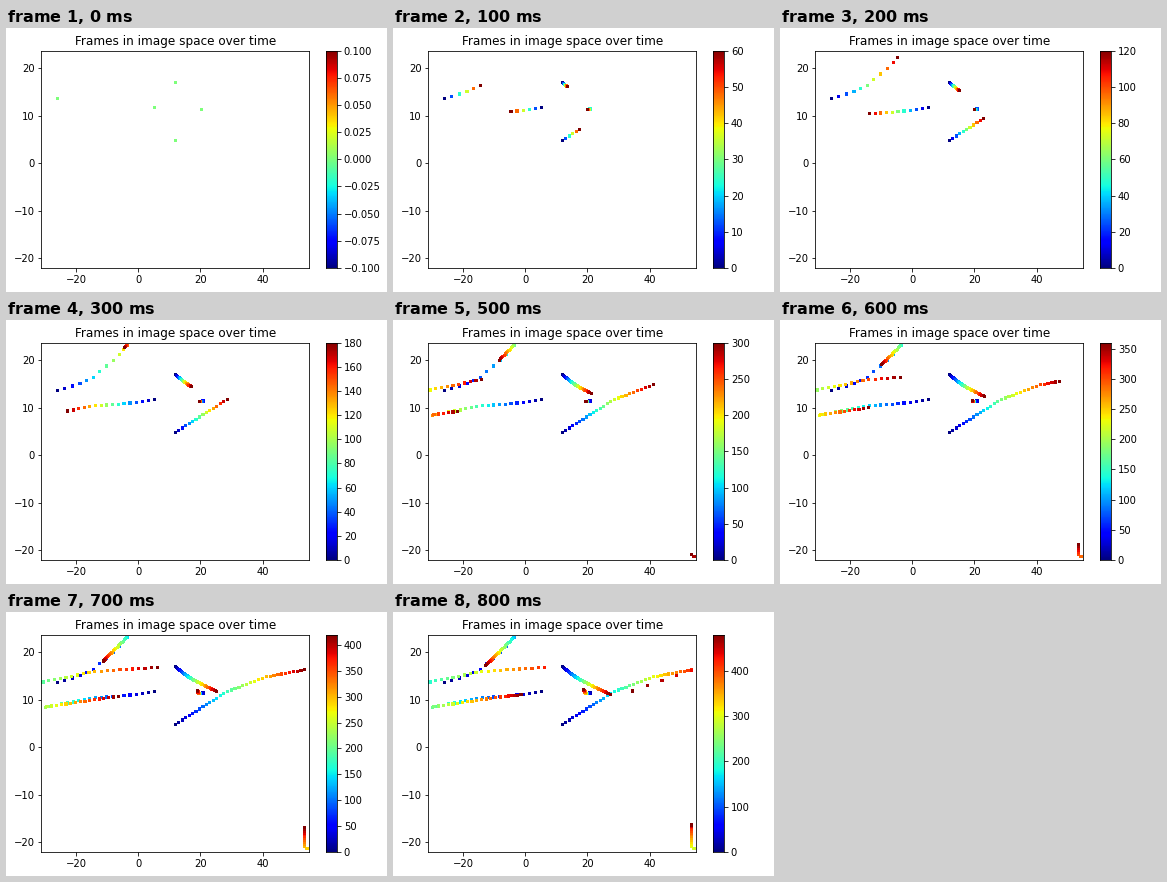
Write a matplotlib script that moves like this. It is 381 px wide and 264 px high and loops after 0.9 s.

```python
import numpy as np
import matplotlib.pyplot as plt
from matplotlib.animation import FuncAnimation
from matplotlib.ticker import MaxNLocator

W, H, DPI = 381, 264, 72
STEPS_PER_FRAME = 5
TIME_PER_STEP = 12


def track(*knots):
    """Rows of (step, x, y) for every step between the knots."""
    s, x, y = np.array(knots).T
    steps = np.arange(s[0], s[-1] + 1)
    return np.column_stack([steps, np.interp(steps, s, x), np.interp(steps, s, y)])


climber = track((0, -26.1, 13.6), (3, -18.8, 15.0), (5, -14.5, 16.3), (9, -6.0, 21.2),
                (11, -3.4, 23.1), (13, -3.7, 23.1), (25, -8.4, 20.0), (40, -12.8, 17.2))
returner = track((0, 5.1, 11.7), (5, -4.6, 10.8), (10, -13.8, 10.4), (19, -30.0, 8.4),
                 (20, -29.4, 8.5), (35, -6.5, 10.7), (40, -1.4, 11.0))
sinker = track((0, 11.9, 16.9), (15, 17.0, 14.4), (25, 21.2, 13.0), (40, 27.3, 11.1))
riser = track((0, 11.9, 4.8), (15, 28.6, 11.7), (25, 41.2, 14.8), (35, 53.6, 16.3),
              (36, 53.4, 16.2), (40, 34.6, 11.8))
idler = track((0, 20.3, 11.3), (2, 20.8, 11.4), (5, 20.0, 11.3), (25, 19.5, 11.2),
              (40, 18.7, 12.2))
entrant = track((16, -30.7, 13.7), (25, -14.0, 15.9), (35, 6.2, 16.8))
corner = track((24, 54.3, -21.3), (25, 53.6, -20.9), (35, 53.6, -16.9), (40, 53.6, -16.4))

points = np.vstack([climber, returner, sinker, riser, idler, entrant, corner])
points = points[np.argsort(points[:, 0], kind="stable")]

plt.rcParams["font.family"] = "DejaVu Sans"
plt.rcParams["font.size"] = 10
fig = plt.figure(figsize=(W / DPI, H / DPI), dpi=DPI, facecolor="white")


def add_axes(left, width):
    return fig.add_axes([left / W, 24 / H, width / W, 217.44 / H])


ax = add_axes(35.4, 267.84)
ax.set(xlim=(-31.2, 55.0), ylim=(-22.1, 23.7),
       xticks=range(-20, 41, 20), yticks=range(-20, 21, 10))
ax.set_title("Frames in image space over time", fontsize=12)
dots = ax.scatter([], [], s=10, c=[], marker="s", linewidths=0, cmap="jet")

cax = add_axes(320, 10.87)
cax.set_xticks([])
cax.yaxis.tick_right()
cax.yaxis.set_major_locator(MaxNLocator(9, steps=[1, 2, 2.5, 5, 10]))
ramp = cax.imshow(np.arange(256)[:, None], cmap="jet", origin="lower",
                  aspect="auto", interpolation="nearest")


def update(i):
    last = i * STEPS_PER_FRAME
    shown = points[points[:, 0] <= last]
    lo, hi = (0, last * TIME_PER_STEP) if i else (-0.1, 0.1)
    dots.set_offsets(shown[:, 1:])
    dots.set_array(shown[:, 0] * TIME_PER_STEP)
    dots.set_clim(lo, hi)
    ramp.set_extent((0, 1, lo, hi))
    cax.set_ylim(lo, hi)
    return dots, ramp


anim = FuncAnimation(fig, update, frames=9, interval=100, repeat=True,
                     repeat_delay=0, blit=False)
plt.show()
```
